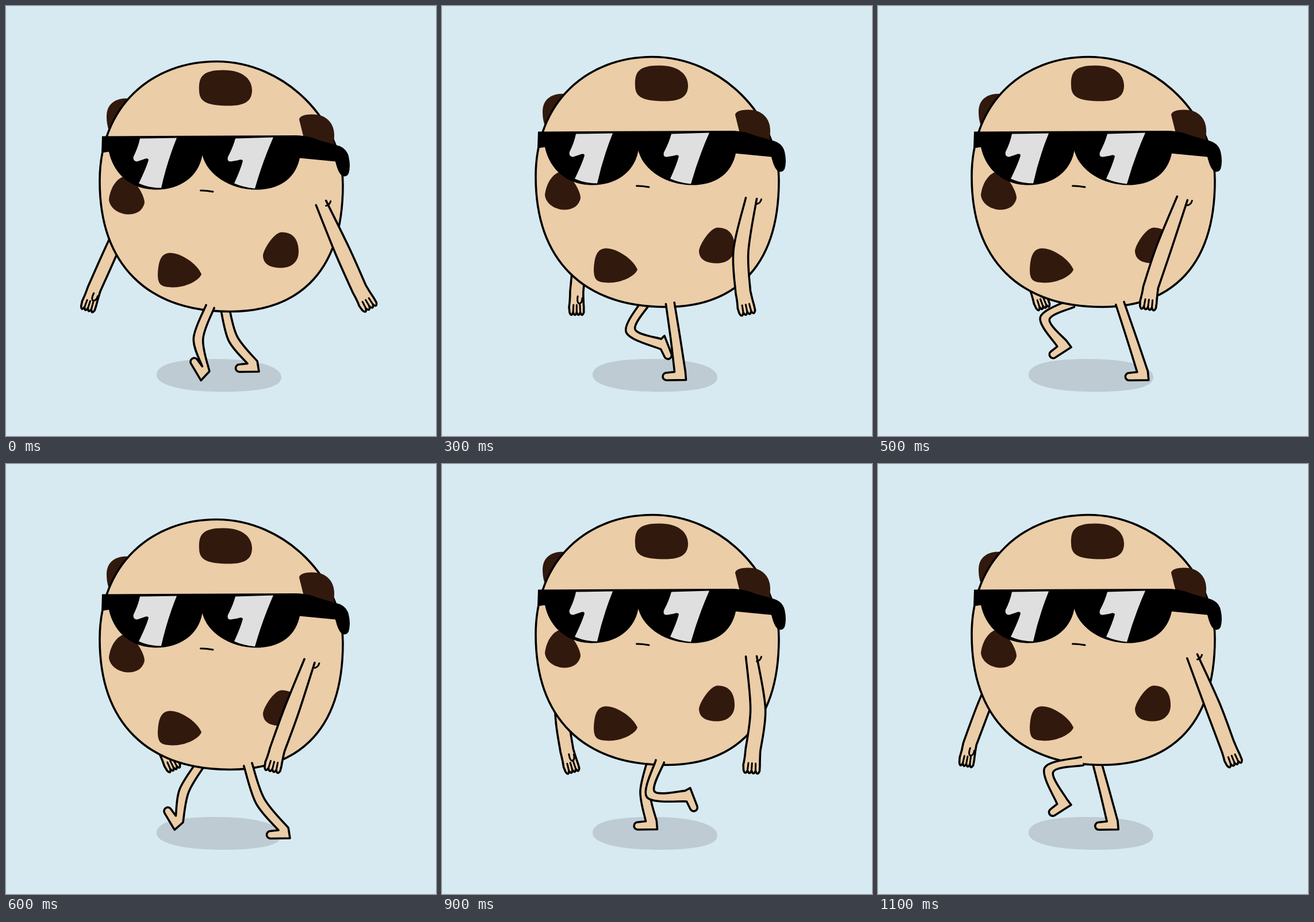
Write an HTML page that moves like this. It is 748 px wide and 748 px high and loops after 1.2 s.

```html
<!DOCTYPE html>
<html lang="en">
<head>
<meta charset="utf-8">
<title>Strolling cookie</title>
<style>
  html, body { margin: 0; width: 100%; height: 100%; overflow: hidden; background: #d7eaf1; }
  svg { display: block; width: 100vw; height: 100vh; }
  .skin { fill: #ebcda8; }
  .chip { fill: #32190d; }
  .glare { fill: #dfdfdf; }
  .line { stroke: #000; stroke-width: 3.6; stroke-linecap: round; stroke-linejoin: round; }
  .ink { fill: none; stroke-width: 3; }
</style>
</head>
<body>
<svg viewBox="0 0 748 748">
  <path fill="#becbd3" d="M262 640C264 620 310 614 365 614C430 614 479 625 479 646C479 664 440 671 375 671C310 671 259 660 262 640Z"/>
  <g id="farArm"></g>
  <g id="farLeg"></g>
  <g id="cookie">
    <path class="chip" d="M219 162C195 158 175 168 175 192C175 207 178 215 182 224L215 210Z"/>
    <path class="skin line" d="M366 97C486 97 586 201 586 312C586 475 497 532 390 532C245 532 163 450 163 305C163 175 253 97 366 97Z"/>
    <g class="chip">
      <path d="M336 148C335 125 340 112 378 112C412 112 428 128 428 147C428 166 415 174 388 174C352 174 336 168 336 148Z"/>
      <path d="M510 198C511 190 525 189 533 189C558 189 571 205 571 226L570 243L518 230Z"/>
      <path d="M206 297C224 299 241 330 241 343C238 356 228 363 212 363C193 362 180 350 179 337C181 318 192 300 206 297Z"/>
      <path d="M285 430C304 430 332 448 340 467C336 478 313 490 290 490C272 489 264 488 264 467C265 441 271 431 285 430Z"/>
      <path d="M480 394C500 394 509 408 509 428C509 446 496 456 478 456C460 456 447 450 447 434C448 424 466 394 480 394Z"/>
    </g>
    <path d="M167 227L505 225.500Q525 226 545 234L573 242Q592 246 596 262Q600 279 596 292Q592 299 585 296Q578 292 573 271L511 265C503 302 474 320 435 320C390 320 350 294 341.500 260C335 298 302 320 262 320C213 320 186 288 179 254L166 256Z"/>
    <path class="glare" d="M233 231L297 230Q280 272 270 317Q249 317 231 309Q245 280 248 268Q247 264 240 267L228 271Q220 270 222 262Q230 246 233 231Z"/>
    <path class="glare" d="M399 231L465 229Q446 272 433 318Q413 316 397 309Q408 285 412 270Q411 266 403 269L391 271Q384 271 386 263Q395 246 399 231Z"/>
    <path class="line ink" d="M338.500 321.500Q346 321 360 323.500"/>
  </g>
  <g id="nearLeg"></g>
  <g id="nearArm"></g>
</svg>
<script>
const FRAME_MS = 100, FRAMES = 12, HALF = FRAMES / 2;
const TAU = 2 * Math.PI;

// Each foot slides from land to lift, then swings back along a Bézier curve
const legs = {
  nearLeg: { shift: 0, hipX: 388, sway: 34, bone: 59.5,
    land: [346, 637], lift: [485, 638], swing: [[634, 616], [216, 496]] },
  farLeg: { shift: HALF, hipX: 359, sway: 22, bone: 54,
    land: [300, 622], lift: [431, 623], swing: [[429, 628], [335, 521]] }
};
const arms = {
  nearArm: { x: 538, sway: 10, side: 1, width: 13 },
  farArm: { x: 220, sway: 0, side: -1, width: 11.5 }
};

const $ = id => document.getElementById(id);
const fmt = p => p.map(v => v.toFixed(1)).join(" ");
const mix = (a, b, k) => a.map((v, i) => v + (b[i] - v) * k);
// Point at p + a*u + b*v
const along = (p, u, a, v = [0, 0], b = 0) => p.map((c, i) => c + u[i] * a + v[i] * b);
const unit = (a, b) => {
  const len = Math.hypot(b[0] - a[0], b[1] - a[1]);
  return [(b[0] - a[0]) / len, (b[1] - a[1]) / len];
};
// Direction of a limb hanging at an angle in degrees, and its right-hand side
const hang = deg => [Math.sin(deg * TAU / 360), Math.cos(deg * TAU / 360)];
const rightOf = d => [d[1], -d[0]];

function bezier(a, b, c, d, k) {
  const left = mix(mix(a, b, k), mix(b, c, k), k);
  const right = mix(mix(b, c, k), mix(c, d, k), k);
  return mix(left, right, k);
}

// Smooth curve through points, without the initial move
function curve(pts) {
  const at = i => pts[Math.max(0, Math.min(pts.length - 1, i))];
  let d = "";
  for (let i = 0; i < pts.length - 1; i++) {
    const [a, b, c, e] = [at(i - 1), at(i), at(i + 1), at(i + 2)];
    const c1 = b.map((v, k) => v + (c[k] - a[k]) / 6);
    const c2 = c.map((v, k) => v - (e[k] - b[k]) / 6);
    d += `C${fmt(c1)} ${fmt(c2)} ${fmt(c)}`;
  }
  return d;
}

const limb = (outline, marks = "") =>
  `<path class="skin line" d="${outline}"/><path class="line ink" d="${marks}"/>`;

function leg({ shift, hipX, sway, bone, land, lift, swing }, frame, bob) {
  const beat = (frame + shift) % FRAMES;
  const swinging = beat >= HALF, k = (beat % HALF) / HALF;
  const hip = [hipX - sway * Math.cos(TAU * (beat + 0.5) / FRAMES), 523 + 0.7 * bob];
  const ankle = swinging ? bezier(lift, ...swing, land, k) : mix(land, lift, k);
  // Toes point down through the swing and up as the heel lands
  const pitch = swinging ? 112 * Math.sin(Math.PI * k) - 60 * k ** 5 : -60 * (1 - k) ** 12;

  const reach = Math.hypot(ankle[0] - hip[0], ankle[1] - hip[1]);
  const bend = Math.max(swinging ? 12 : 0, Math.sqrt(Math.max(0, bone ** 2 - reach ** 2 / 4)));
  const back = rightOf(unit(hip, ankle));
  const knee = along(mix(hip, ankle, 0.5), back, -bend);
  const thighBack = rightOf(unit(hip, knee)), shinBack = rightOf(unit(knee, ankle));

  const sole = hang(pitch), toeward = rightOf(sole).map(v => -v);
  const foot = (forward, down) => along(ankle, toeward, forward, sole, down);
  const r = 6.5;
  return limb(`M${fmt(along(hip, thighBack, -7.5))}` +
    curve([along(hip, thighBack, -7.5), along(knee, back, -8.5), foot(11, -1)]) +
    `L${fmt(foot(25, 7 - r))}A${r} ${r} 0 0 0 ${fmt(foot(25, 7 + r))}L${fmt(foot(-9, 13))}` +
    `L${fmt(along(ankle, shinBack, 8))}` +
    curve([along(ankle, shinBack, 8), along(knee, back, 8), along(hip, thighBack, 7.5)]));
}

function arm({ x, sway, side, width }, frame, bob) {
  const c = Math.cos(TAU * frame / FRAMES), s = Math.sin(TAU * frame / FRAMES);
  const angle = side * (22 * c + 4 * c * c - 2 - 3 * s);
  const dir = hang(angle), right = rightOf(dir);
  const shoulder = [x + sway * c, 343 + bob];
  const wrist = along(shoulder, dir, 164);
  const elbow = along(shoulder, dir, 92, right, -10 * side * s ** 3);
  const palm = hang(angle + 6 + 11 * side * s), across = rightOf(palm);
  const h = (px, py) => fmt(along(wrist, across, px * width / 13, palm, py));

  const edge = sign => [along(shoulder, right, 9.5 * sign), along(elbow, right, width * sign),
    along(wrist, across, width * sign)];
  let hand = `Q${h(-13, 14)} ${h(-15, 26)}L${h(-14, 35)}`, marks = "";
  for (let f = -14; f < 14; f += 7) {
    hand += `Q${h(f + 3.5, 44)} ${h(f + 7, 35)}`;
    if (f > -14) marks += `M${h(f * 0.9, 22)}L${h(f, 35)}`;
  }
  hand += `L${h(14, 26)}Q${h(13, 14)} ${h(13, 0)}`;
  const [left, rightEdge] = [edge(-1), edge(1)];
  marks += side > 0
    ? `M${fmt(along(rightEdge[0], [0, 1], 9))}q6 -1 8 -8`
    : `M${h(2, 7)}Q${h(0, 18)} ${h(5, 20)}Q${h(11, 19)} ${h(11, 10)}`;
  return limb(`M${fmt(left[0])}${curve(left)}${hand}${curve(rightEdge.reverse())}`, marks);
}

let shown = -1;
function draw(ms) {
  const frame = Math.floor(ms / FRAME_MS) % FRAMES;
  if (frame === shown) return;
  shown = frame;
  const bob = -4.5 + 8 * Math.cos(TAU * (frame - 1) / HALF);
  $("cookie").setAttribute("transform", `translate(0 ${bob.toFixed(1)})`);
  for (const id in legs) $(id).innerHTML = leg(legs[id], frame, bob);
  for (const id in arms) $(id).innerHTML = arm(arms[id], frame, bob);
}

const start = performance.now();
function tick() {
  draw(performance.now() - start);
  requestAnimationFrame(tick);
}
tick();
</script>
</body>
</html>
```
